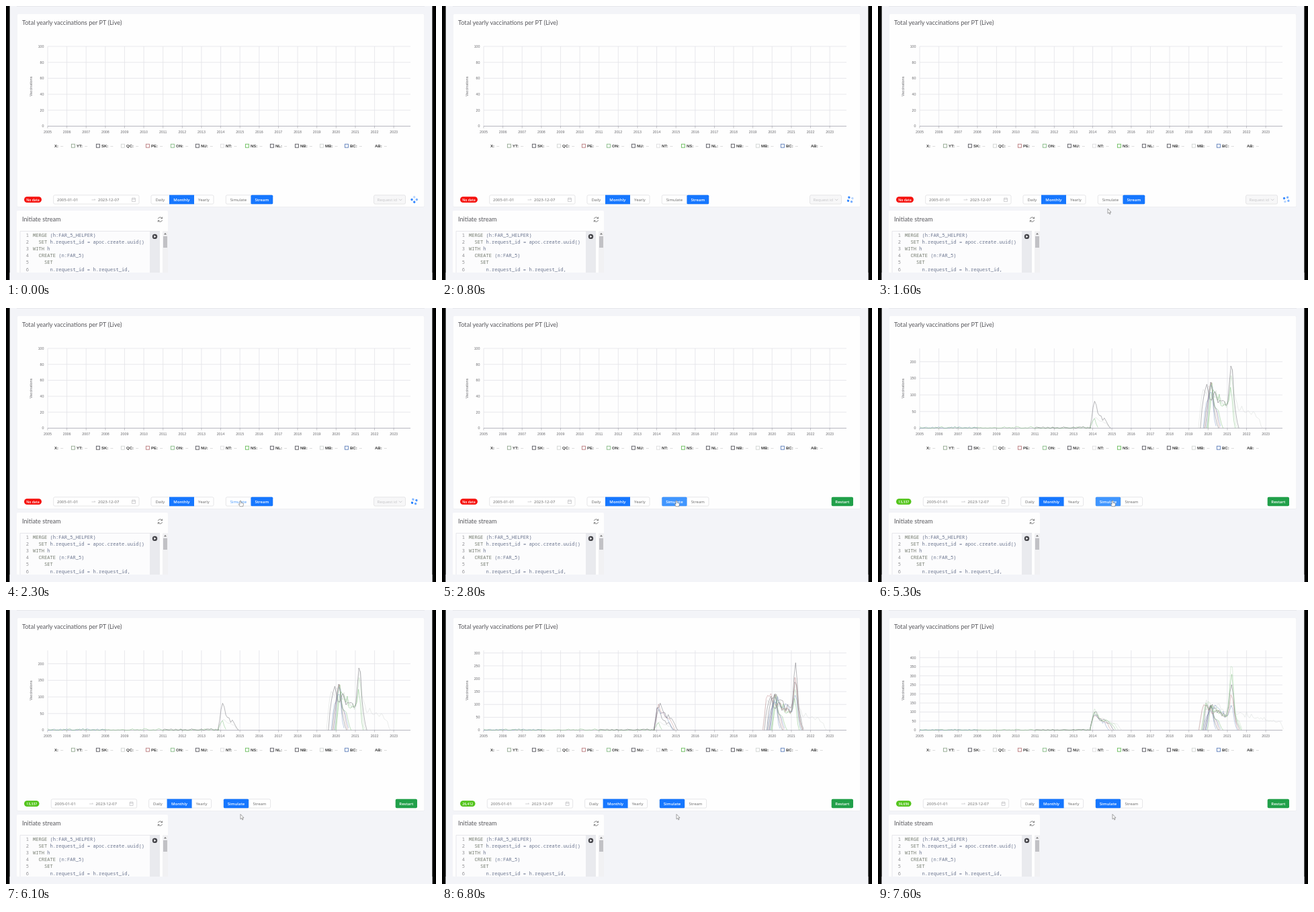
These frames come from a looping animation (640x407 px, 8 s). An HTML page:

```html
<!DOCTYPE html>
<html lang="en">
<head>
<meta charset="utf-8">
<title>Live vaccinations chart</title>
<style>
  html, body { margin: 0; width: 100%; height: 100%; overflow: hidden; background: #000; }
  svg { display: block; width: 100%; height: 100%; }
  text { white-space: pre; }
  .title { font: 9.15px Lato, sans-serif; fill: #57575c; }
  .ui { font: 6px "Open Sans", sans-serif; fill: #666; }
  .axis { font: 5.3px "Liberation Sans", sans-serif; fill: #6c6c70; }
  .key { font: bold 6px "Liberation Sans", sans-serif; fill: #3c3c3c; }
  .code { font: 7.1px "Noto Sans Mono", monospace; fill: #6c7690; }
  .mid { text-anchor: middle; }
  .end { text-anchor: end; }
  .strong { font-weight: 600; fill: #fff; }
  .line { stroke-width: .7; stroke-linejoin: round; opacity: .6; }
</style>
</head>
<body>
<svg id="stage" viewBox="0 0 640 407" preserveAspectRatio="none"></svg>
<script>
const LOOP = 8000;
const LEFT = 62, RIGHT = 602, TOP = 60, BASE = 178.5, YEAR = 28.62, FIRST_YEAR = 2005;
const BLUE = '#1677ff', HOVER = '#4096ff', GRID = '#e3e3e8', BORDER = '#dcdcde';
const DARK = '#55555c', GREEN = '#68b568', PALE = '#d0d4d2', MINT = '#b2d9b2',
      RED = '#b8787c', NAVY = '#6685bd';

const rect = (x, y, w, h, fill, extra = '') =>
  `<rect x="${x}" y="${y}" width="${w}" height="${h}" fill="${fill}" ${extra}/>`;
const text = (x, y, cls, str, extra = '') =>
  `<text x="${x}" y="${y}" class="${cls}" ${extra}>${str}</text>`;
const path = (d, stroke, extra = '') =>
  `<path d="${d}" fill="none" stroke="${stroke}" ${extra}/>`;
const range = (n, fn) => Array.from({ length: n }, (_, i) => fn(i));
const draw = (n, fn) => range(n, fn).join('');
const clamp = v => Math.max(0, Math.min(1, v));
const ease = (t, from, to) => { const f = clamp((t - from) / (to - from)); return f * f * (3 - 2 * f); };
const random = n => { const v = Math.sin(n * 12.9898) * 43758.5453; return v - Math.floor(v); };

const yearX = year => LEFT + (year - FIRST_YEAR) * YEAR;
const valueY = (value, max) => BASE - (BASE - TOP) * value / max;

// A series is a colour, a span of years and a value for each month in it.
// Waves rise fast, fade steadily, and have one crest on top.
const wave = (color, from, to, level, peak, crest) => ({
  color, from, to,
  value(year, noise) {
    const edge = clamp((year - from) / .2) * clamp((to - year) / .2);
    const fade = 1 - .75 * (year - from) / (to - from);
    return edge * (level * fade * (.8 + .4 * noise) + peak * Math.exp(-(((year - crest) / .13) ** 2)));
  }
});
const quiet = (color, from, to) => ({ color, from, to, value: (year, noise) => 5 * noise ** 3 });
const wave2014 = (color, to, level, peak) => wave(color, 2013.85, to, level, peak, 2014.1);
const wave2021 = (color, from, to, level, peak) => wave(color, from, to, level, peak, 2021.22);

function seriesSvg({ color, from, to, value }, max, seed) {
  const points = range(Math.round((to - from) * 12) + 1, k => {
    const year = from + k / 12;
    return `${yearX(year).toFixed(1)},${valueY(value(year, random(seed * 97 + k)), max).toFixed(1)}`;
  });
  return path('M' + points.join('L'), color, 'class="line"');
}

const calm = [quiet(NAVY, 2005, 2008), quiet(GREEN, 2005, 2013.9), quiet(DARK, 2011, 2013.9)];
const bursts = [NAVY, DARK, RED, NAVY, GREEN].map((color, i) =>
  wave(color, 2019.75 + i * .05, 2020.45 + i * .08, 110, 55, 2020.15));
const firstBatch = [
  ...calm, ...bursts,
  wave2014(PALE, 2014.95, 38, 0),
  wave2014(GREEN, 2014.3, 35, 10),
  wave2014(DARK, 2014.9, 55, 36),
  wave2021(PALE, 2019.5, 2022.8, 120, 100),
  wave2021(MINT, 2019.95, 2021.5, 120, 110),
  wave2021(GREEN, 2020, 2021.4, 130, 80),
  wave2021(DARK, 2019.6, 2021.6, 130, 150)
];
const lateBatch = [PALE, NAVY, RED, DARK, GREEN, MINT].flatMap((color, i) => [
  wave2014(color, i ? 2014.7 + i * .13 : 2015.5, 95, 7 * i),
  wave2021(color, 2019.5 + random(i) * .4, i ? 2021.45 + i * .07 : 2023.95, 150, 35 + 55 * i)
]);

const charts = [
  { start: 0, max: 100, step: 20, series: [] },
  { start: 4600, max: 240, step: 50, count: '13,337', series: firstBatch },
  { start: 6300, max: 310, step: 50, count: '26,412', series: [...firstBatch, ...lateBatch.slice(2, 8)] },
  { start: 7500, max: 440, step: 50, count: '39,656', series: [...calm, ...bursts, ...lateBatch] }
];

function chartSvg({ max, step, count, series }, i) {
  const rows = draw(Math.floor(max / step) + 1, k => {
    const y = valueY(k * step, max);
    return (k ? path(`M${LEFT},${y}H${RIGHT}`, GRID, 'stroke-width=".8"') : '') +
      text(56.5, y + 1.9, 'axis end', k * step);
  });
  const width = count ? 22.5 : 26;
  const badge = rect(27, 283.3, width, 8.6, count ? '#52c41a' : '#f5100c', 'rx="4.3"') +
    text(27 + width / 2, 289.5, 'ui mid strong', count || 'No data', 'style="font-size:5.1px"');
  return `<g id="chart${i}">${rows}${series.map((s, k) => seriesSvg(s, max, k + 1)).join('')}${badge}</g>`;
}

function frameSvg() {
  const years = draw(19, i => {
    const x = yearX(FIRST_YEAR + i);
    return path(`M${x},${TOP}V${BASE}`, GRID, 'stroke-width=".8"') +
      path(`M${x},${BASE}v3`, '#9a9aa2', 'stroke-width=".6"') +
      text(x, 189.4, 'axis mid', FIRST_YEAR + i);
  });
  return rect(5.6, 0, 628.8, 407, '#f3f4f8') + rect(16, 0, 607, 1, '#e7e8ec') +
    rect(16, 12, 607, 286.5, '#e9eaee', 'rx="1.5"') + rect(16.5, 12, 606, 286, '#fefefe', 'rx="1.5"') +
    text(24, 28, 'title', 'Total yearly vaccinations per PT (Live)') + years +
    path(`M${LEFT},${BASE}H${RIGHT}`, '#9a9aa6', 'stroke-width=".7"') +
    text(0, 0, 'axis mid', 'Vaccinations', 'transform="translate(39.4 119.5) rotate(-90)"');
}

function legendSvg() {
  const colors = { YT: '#91a78f', QC: PALE, PE: RED, ON: '#83b983', NT: '#dcdcde',
    NS: '#66bb58', MB: PALE, BC: '#5a7cb8' };
  return 'X YT SK QC PE ON NU NT NS NL NB MB BC AB'.split(' ').map((name, i, all) => {
    const x = 60 + i * 37;
    const boxed = i > 0 && i < all.length - 1;
    const box = rect(x + .4, 205.2, 5, 5, '#fff', `stroke="${colors[name] || DARK}" stroke-width=".9"`);
    return (boxed ? box : '') + text(i ? x + 8 : 72, 210, 'key',
      `${name}:<tspan dx="3.2" font-weight="400" fill="#999">--</tspan>`);
  }).join('');
}

function controlsSvg() {
  const label = (x, str, cls = 'mid', extra = '') => text(x, 289.7, 'ui ' + cls, str, extra);
  const box = (x, w, fill = '#fff') =>
    rect(x, 280.9, w, 13.2, fill, `rx="2" stroke="${BORDER}" stroke-width=".7"`);
  const fill = (x, w, color, extra = '') => rect(x, 280.7, w, 13.6, color, extra);
  const option = (id, x, w, name) =>
    fill(x, w, BLUE, `id="${id}Fill" rx="1.5"`) + label(x + w / 2, name, 'mid', `id="${id}Text"`);
  const icon = d => path(d, '#b4b4b8', 'stroke-width=".6"');
  return `<g id="controls">${box(70.7, 127.3)}
    ${label(76, '2005-01-01', '')}${label(137, '2023-12-07', '')}
    ${icon('M127.5,288h5.5m-1.6,-1.4l1.6,1.4')}
    ${icon('M187.5,285.5h5v5h-5zm0,1.8h5m-3.7,-2.6v1.4m2.4,-1.4v1.4')}
    ${box(216, 93)}${label(229.4, 'Daily')}${fill(243, 37, BLUE)}
    ${label(261.4, 'Monthly', 'mid strong')}${label(294.5, 'Yearly')}
    ${box(327.3, 69.7)}${path('M364.5,281v13', BORDER, 'stroke-width=".7"')}
    ${option('simulate', 327.3, 37.2, 'Simulate')}${option('stream', 364.5, 32.7, 'Stream')}</g>
    <g id="request">${box(547.5, 47, '#f7f7f8')}
    ${label(552.5, 'Request id', '', 'style="fill:#c3c3c6"')}${icon('M585,286.7l2.2,2.2l2.2,-2.2')}
    <g id="spinner">${draw(4, i => `<circle cx="${i % 2 ? 2.6 : -2.6}" cy="${i > 1 ? 2.6 : -2.6}" r="1.7" fill="${BLUE}"/>`)}</g></g>
    <g id="restart">${fill(579.7, 32.3, '#21a04a', 'rx="2"')}${label(595.8, 'Restart', 'mid strong')}</g>`;
}

function editorSvg() {
  const code = `MERGE (h:FAR_5_HELPER)
  SET h.request_id = apoc.create.uuid()
WITH h
  CREATE (n:FAR_5)
    SET
      n.request_id = h.request_id,`;
  const lines = code.split('\n').map((line, i) => {
    const y = 342.6 + i * 10.2;
    const colored = line.replace(/MERGE|SET|WITH|CREATE/, '<tspan fill="#757c70">$&</tspan>');
    return text(34, y, 'code end', i + 1, 'style="fill:#929296"') + text(40, y, 'code', colored);
  }).join('');
  return rect(16, 304, 225, 92, '#fefefe', 'rx="1.5"') + text(24, 320, 'title', 'Initiate stream') +
    path('M226.3,316.2a3.3,3.3 0 0 1 6,-.8m.3,-2v2.3h-2.2M232.6,318a3.3,3.3 0 0 1 -6,.9m-.3,2v-2.3h2.2', '#666', 'stroke-width=".8"') +
    rect(21, 334.5, 208, 61.5, '#fcfcfd') + rect(214, 334.5, 15, 61.5, '#e9eaee') +
    path('M21,396V334.5H229', '#dedfe4', 'stroke-width=".7"') + lines +
    '<circle cx="221.5" cy="342.4" r="3.7" fill="#46464b"/><path d="M220.4,340.5v3.8l3,-1.9z" fill="#fff"/>' +
    rect(233, 334.5, 8, 61.5, '#f1f1f3') + rect(234, 342, 6, 17, '#c1c1c5') +
    '<path d="M235,339.5h4l-2,-2.4z" fill="#777"/>' + rect(5.6, 396, 628.8, 11, '#f3f4f8');
}

const cursorSvg = `<g id="cursor" fill="#fff" stroke="#666" stroke-width=".6">
  <path id="arrow" d="M0,0V7.2L1.7,5.7L2.8,8.3L4,7.8L2.9,5.3H5z"/>
  <path id="hand" d="M-.9,.8Q0,-.6 .9,.8V3.3L3.9,4Q4.6,4.3 4.4,5.4L3.7,8.8H-.6L-2.8,5.6Q-2.6,4.5 -.9,5.6z"/></g>`;

document.getElementById('stage').innerHTML = frameSvg() + charts.map(chartSvg).join('') +
  legendSvg() + controlsSvg() + editorSvg() + cursorSvg;

const el = id => document.getElementById(id);
const show = (id, on) => el(id).setAttribute('display', on ? 'inline' : 'none');
const move = (id, x, y, more = '') => el(id).setAttribute('transform', `translate(${x} ${y})${more}`);

function setOption(id, selected, hovered) {
  el(id + 'Fill').setAttribute('fill', selected ? (hovered ? HOVER : BLUE) : 'none');
  el(id + 'Text').style.fill = selected ? '#fff' : hovered ? HOVER : '#666';
  el(id + 'Text').style.fontWeight = selected ? 600 : 400;
}

function update(t) {
  const simulating = t >= 2400;
  const enter = ease(t, 1000, 1500), reach = ease(t, 1900, 2300), leave = ease(t, 5300, 5750);
  const x = 326 + 16 * enter + 7 * reach;
  const y = 340 - 39 * enter + 15 * (leave - reach) + 2.4 * ease(t, 6000, 6100);
  const hovered = y < 294.5;
  const current = charts.filter(c => t >= c.start).length - 1;

  charts.forEach((_, i) => show('chart' + i, i === current));
  move('controls', current ? -3.4 : 0, 0);
  setOption('simulate', simulating, hovered);
  setOption('stream', !simulating, false);
  show('request', !simulating);
  show('restart', simulating);

  move('spinner', 607.7, 287.5, ` rotate(${45 + t / 1200 * 360})`);
  [...el('spinner').children].forEach((dot, i) => {
    const phase = (t / 1000 + i * .4) % 2;
    dot.setAttribute('opacity', .3 + .7 * clamp(1 - Math.abs(phase - 1)));
  });

  show('cursor', t >= 1000);
  show('arrow', !hovered);
  show('hand', hovered);
  move('cursor', x, y);
}

const started = performance.now();
function tick() {
  update((performance.now() - started) % LOOP);
  requestAnimationFrame(tick);
}
tick();
</script>
</body>
</html>
```
